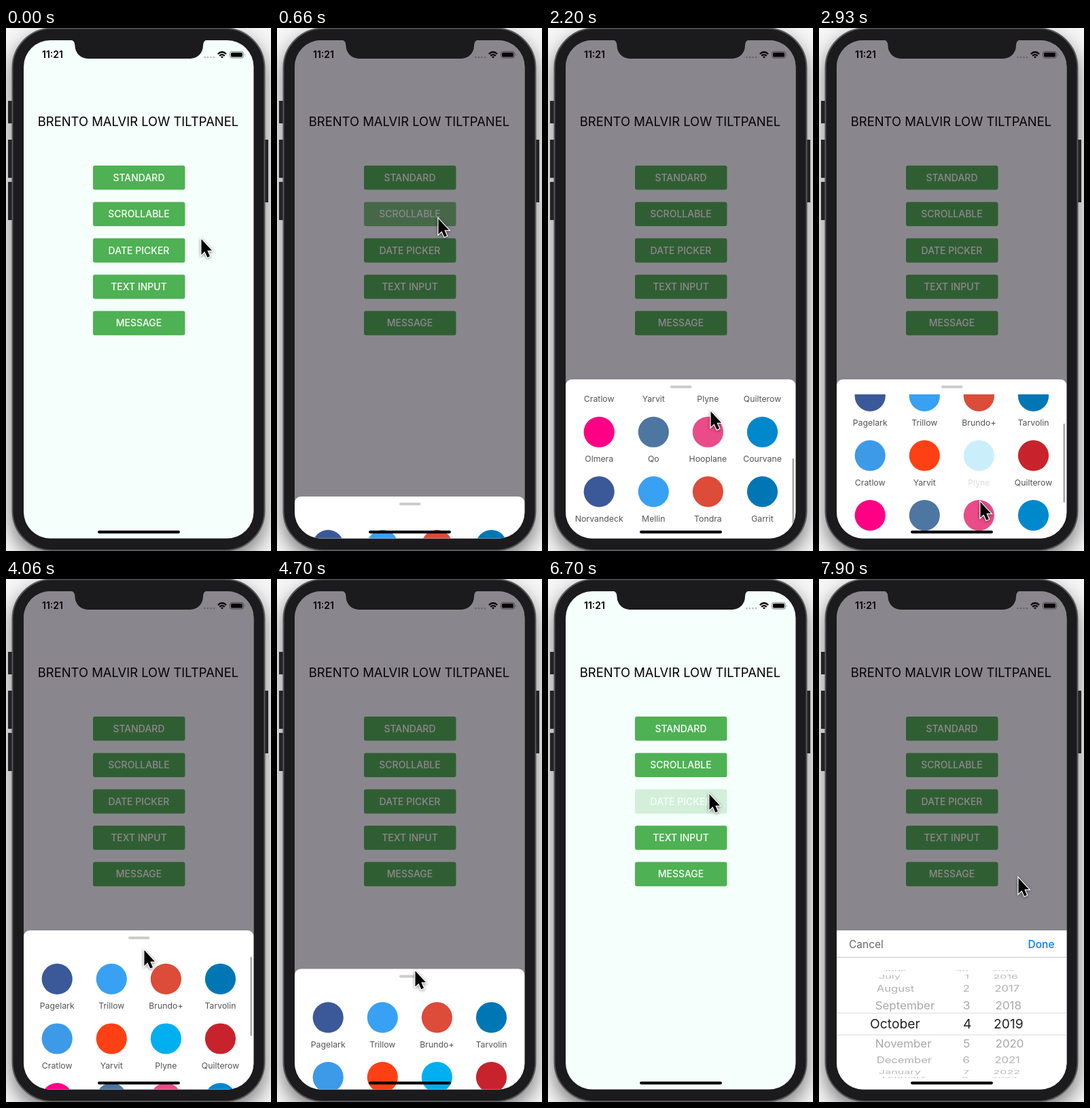
An HTML page for the animation above (8000 ms loop, 390x768 px).

```html
<!DOCTYPE html>
<html lang="en">
<head>
<meta charset="utf-8">
<title>Bottom sheet demo</title>
<style>
  html, body { margin: 0; width: 100%; height: 100%; overflow: hidden; background: #f6f6f6; }
  svg { display: block; font-family: Inter, Roboto, sans-serif; }
  .case { fill: #1b1b1d; stroke: #58595b; stroke-width: 2; filter: drop-shadow(0 12px 14px rgba(0, 0, 0, .5)); }
  .pointer { filter: drop-shadow(0 1px 2px rgba(0, 0, 0, .45)); }
  .mid { text-anchor: middle; }
  .end { text-anchor: end; }
</style>
</head>
<body>
<svg width="390" height="768" viewBox="0 0 390 768">
  <defs>
    <clipPath id="screen"><rect x="26" y="18" width="338.5" height="731.5" rx="39"/></clipPath>
    <clipPath id="list"><rect x="26" y="538" width="339" height="212"/></clipPath>
  </defs>

  <path d="M6 107v33M6 164v56M6 226v56M383 164v92" stroke="#2c2d2f" stroke-width="6"/>
  <rect class="case" x="9.5" y=".5" width="371" height="766.5" rx="58"/>

  <g clip-path="url(#screen)">
    <rect x="26" y="18" width="339" height="732" fill="#f5fffc"/>
    <text x="53" y="44" font-size="14" font-weight="600">11:21</text>
    <path d="M292.5 43h14" stroke="#b4b9b8" stroke-width="2.6" stroke-linecap="round" stroke-dasharray="0 4.5"/>
    <path d="M311.8 38.2Q318 32.3 324.2 38.2M314.2 40.9Q318 37.3 321.8 40.9" fill="none" stroke="#000" stroke-width="2.2"/>
    <path d="M318 44.5L316 42.3Q318 40.7 320 42.3Z"/>
    <rect x="329.5" y="34.5" width="20" height="9.5" rx="2.8" fill="none" stroke="#7d8180"/>
    <rect x="331" y="36" width="17" height="6.5" rx="1.5"/>
    <path d="M351 37.5q1.5 1.7 0 3.5z" fill="#7d8180"/>
    <text class="mid" x="194.5" y="144" font-size="18.4">BRENTO MALVIR LOW TILTPANEL</text>
    <g id="buttons"></g>
    <rect id="dim" x="26" y="18" width="339" height="732" fill="rgba(16,0,16,.47)"/>

    <g id="sheet">
      <rect x="26" y="516" width="338.5" height="270" rx="9" fill="#fff"/>
      <rect x="180" y="525" width="31.5" height="4" rx="2" fill="#ccc"/>
      <g clip-path="url(#list)"><g id="grid"></g></g>
      <rect id="thumb" x="359.5" width="2.6" height="116" rx="1.3" fill="#a6a6a6"/>
    </g>

    <g id="picker">
      <rect x="26" y="516" width="339" height="240" fill="#fff"/>
      <path d="M26 555.5H365" stroke="#c8c8c8"/>
      <path d="M26 637.5H365M26 669.5H365" stroke="#dcdcdc"/>
      <text x="44" y="541.5" font-size="15.5" fill="#666">Cancel</text>
      <text class="end" x="346.5" y="541.5" font-size="15.5" font-weight="500" fill="#007aff">Done</text>
      <g id="wheel"></g>
    </g>
    <rect x="135" y="738" width="121" height="4.2" rx="2.1"/>
  </g>

  <path d="M94 17Q101.5 18 101.5 26A19 19 0 0 0 120.5 45H271A19 19 0 0 0 290 26Q290 18 297 17Z" fill="#1b1b1d"/>
  <g id="pointer" class="pointer">
    <path d="M1.5 2V25L6.5 20.3L10.3 28.8L14 27.2L10.3 18.8H17Z" stroke="#fff" stroke-width="2.4" paint-order="stroke"/>
  </g>
</svg>
<script>
const LOOP = 8000, SHEET = 234;
const { buttons, dim, sheet, grid, thumb, picker, wheel, pointer } =
  Object.fromEntries([...document.querySelectorAll('[id]')].map(node => [node.id, node]));

buttons.innerHTML = ['STANDARD', 'SCROLLABLE', 'DATE PICKER', 'TEXT INPUT', 'MESSAGE'].map((label, i) =>
  `<g transform="translate(128 ${202 + i * 53.4})">
    <rect width="135.5" height="35.6" rx="3" fill="#4eb153"/>
    <text class="mid" x="67.5" y="22.9" font-size="14" font-weight="500" fill="#fff">${label}</text>
  </g>`).join('');

const labels = ('Pagelark Trillow Brundo+ Tarvolin Cratlow Yarvit Plyne Quilterow ' +
  'Olmera Qo Hooplane Courvane Norvandeck Mellin Tondra Garrit').split(' ');
const colors = ('#3b5998 #38a1f3 #dd4b39 #0077b5 #3d9ae8 #ff4015 #00aff0 #c8232c ' +
  '#ff0084 #4d76a1 #ea4c89 #0088cc').split(' ');
grid.innerHTML = labels.map((label, i) =>
  `<g transform="translate(${75.2 + i % 4 * 80.1} ${587.4 + Math.floor(i / 4) * 87.6})">
    <circle r="22.6" fill="${colors[i % colors.length]}"/>
    <text class="mid" y="43.8" font-size="12.3" fill="#555">${label}</text>
  </g>`).join('');

// Date wheel: rows wrapped around a cylinder, k steps from the chosen date
for (let k = -4; k <= 4; k++) {
  const on = k === 0, angle = k * 0.363, gray = 158 + Math.abs(k) * 9;
  const month = new Date(2019, 9 + k, 1).toLocaleString('en-US', { month: 'long' });
  const day = new Date(2019, 9, 4 + k).getDate();
  wheel.innerHTML += `<g font-size="${on ? 19.3 : 17}" fill="${on ? '#222' : `rgb(${gray},${gray},${gray})`}"
      transform="translate(195 ${653.5 + 79 * Math.sin(angle)}) scale(${1 - 0.006 * k * k} ${Math.cos(angle)})">
    <text x="${on ? -120 : -113}" y="6.5">${month}</text>
    <text class="end" x="${on ? 29.5 : 27.5}" y="6.5">${day}</text>
    <text x="${on ? 62 : 65}" y="6.5">${2019 + k}</text>
  </g>`;
}

const ramp = (t, from, to) => Math.min(1, Math.max(0, (t - from) / (to - from)));
const ease = (t, from, to) => { const u = ramp(t, from, to); return u * u * (3 - 2 * u); };
const move = (node, x, y) => node.setAttribute('transform', `translate(${x} ${y})`);
const show = (node, on) => node.setAttribute('visibility', on ? 'visible' : 'hidden');
const fade = (node, opacity) => node.setAttribute('opacity', opacity);
const pressed = (t, down, up) => 1 - 0.8 * (ease(t, down, down + 120) - ease(t, up, up + 160));

// Pointer gestures: start, end, destination x, y
const gestures = [
  [30, 300, 236, 278],
  [1030, 1260, 246, 617],
  [1460, 2260, 238, 560],
  [2300, 2930, 236, 694],
  [3130, 3860, 202, 543],
  [4060, 4200, 202, 517],
  [4900, 5460, 202, 731],
  [5700, 6000, 283, 512],
  [6200, 6500, 236, 314],
  [7260, 7650, 285, 472],
  [7650, 7900, 292, 437]
];

function pointerAt(t) {
  let x = 286, y = 308;
  for (const [from, to, toX, toY] of gestures) {
    const k = ease(t, from, to);
    x += (toX - x) * k;
    y += (toY - y) * k;
  }
  // a tug on the sheet: down and back up
  y += 60 * (1 - Math.cos(2 * Math.PI * ramp(t, 4200, 4860)));
  return [x, y];
}

function draw(t) {
  const [x, y] = pointerAt(t);
  const sheetOpen = t >= 560 && t < 5700, pickerOpen = t >= 6930;

  // scroll to the end, then a fling back that loses speed
  const scroll = 172 * ease(t, 1460, 2260) * (1 - ramp(t, 2300, 3860)) ** 2.5;
  // the sheet slides in, later follows the pointer, then drops shut
  const dragged = t < 4200 ? 0 : y - 517;
  const drop = t < 5660 ? SHEET * (1 - ease(t, 575, 830)) + dragged : SHEET - 3;

  move(pointer, x, y);
  move(sheet, 0, drop);
  move(grid, 0, -scroll);
  move(picker, 0, SHEET * (1 - ease(t, 6930, 7110)));
  show(dim, sheetOpen || pickerOpen);
  show(sheet, sheetOpen);
  show(picker, pickerOpen);

  thumb.setAttribute('y', Math.min(632, 555 + scroll * 0.55));
  fade(thumb, ramp(t, 1460, 1520) - ramp(t, 4060, 4260));
  fade(buttons.children[1], pressed(t, 290, 560));
  fade(buttons.children[2], pressed(t, 6560, 6930));
  fade(grid.children[6], pressed(t, 2740, 2930));
}

const start = performance.now();
function frame() {
  draw((performance.now() - start) % LOOP);
  requestAnimationFrame(frame);
}
frame();
</script>
</body>
</html>
```
